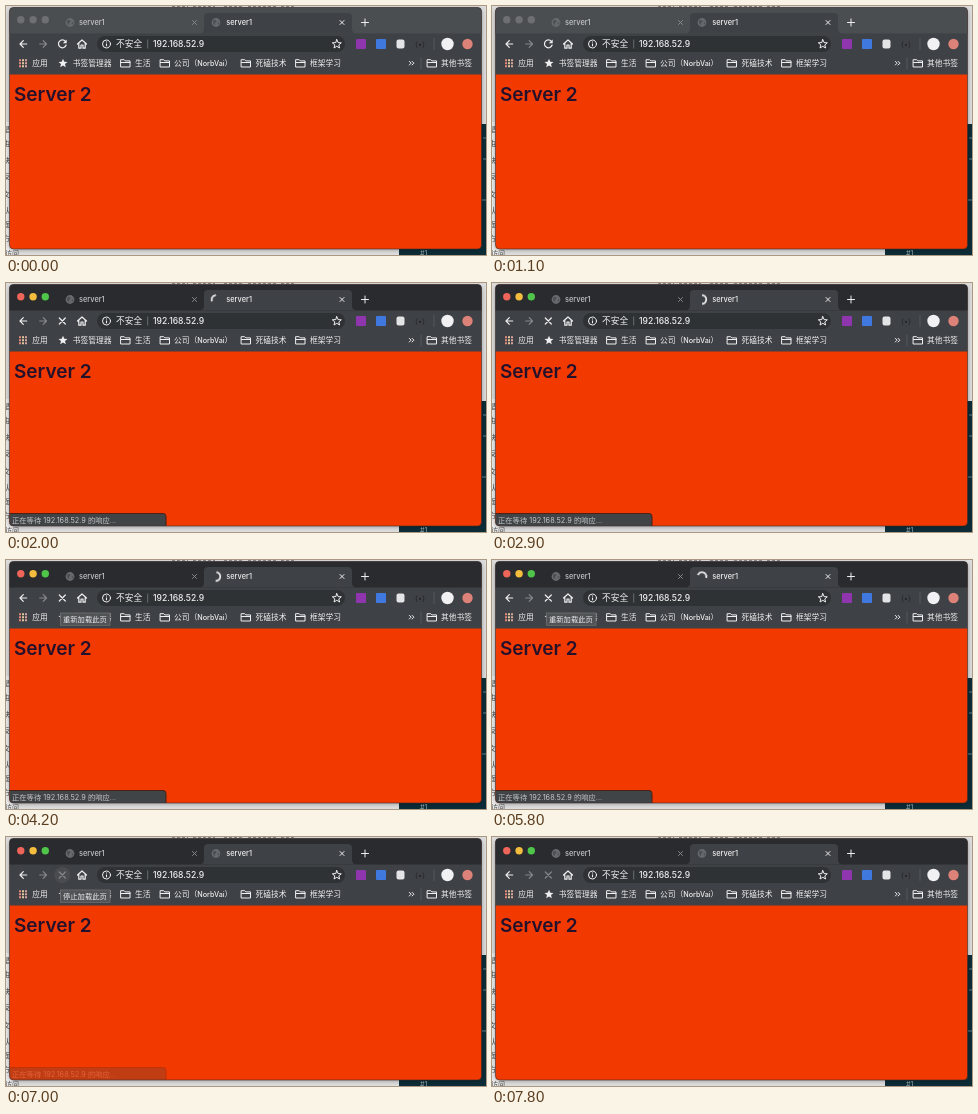
Recreate the animation shown at these times as an HTML page. Size 480 by 249 pixels, loop 8 s.

```html
<!DOCTYPE html>
<html lang="zh">
<head>
<meta charset="utf-8">
<title>Browser reload</title>
<style>
html, body { margin: 0; width: 100%; height: 100%; overflow: hidden; background: #dcdcdc; }
svg { display: block; width: 100vw; height: 100vh; }
text { font-family: Inter, "Noto Sans CJK SC", sans-serif; fill: #eeeff0; white-space: pre; }
.label { font-size: 7.75px; font-weight: 500; }
.latin { font-size: 7.2px; }
.tip text { font-size: 7.3px; font-weight: 500; }
.tip rect { fill: #505356; stroke: #727476; stroke-width: .7; }
.tab { font-size: 7.4px; font-weight: 500; fill: #c4c6c9; }
.behind text { font-size: 7px; fill: #444; }
.line { fill: none; stroke: #eeeff0; stroke-width: 1.2; stroke-linecap: round; stroke-linejoin: round; }
.thin { stroke-width: 1; }
.dim { stroke: #85888c; }

.idle, .live, .reload, .stop, .stopped, .hover, .globe, .tip, .status, .spinner {
  animation: 8s step-end infinite;
}
.idle { animation-name: idle; }
.live { animation-name: live; }
.hover { animation-name: hover; }
.reload { animation-name: reload; }
.stop, .spinner { animation-name: loading; }
.stopped { animation-name: stopped; }
.globe { animation-name: globe; }
.tip-reload { animation-name: tip-reload; }
.tip-stop { animation-name: tip-stop; }
.status { animation-name: status; animation-timing-function: linear; }
@keyframes idle { 0% { opacity: 1 } 17.5%, 100% { opacity: 0 } }
@keyframes live { 0% { opacity: 0 } 17.5%, 100% { opacity: 1 } }
@keyframes hover { 0%, 19.75%, 96.25%, 100% { opacity: 0 } 17.5% { opacity: 1 } 83.125% { opacity: .5 } }
@keyframes reload { 0% { opacity: 1 } 19.75%, 100% { opacity: 0 } }
@keyframes loading { 0%, 83.125%, 100% { opacity: 0 } 19.75% { opacity: 1 } }
@keyframes stopped { 0% { opacity: 0 } 83.125%, 100% { opacity: 1 } }
@keyframes globe { 0%, 83.125%, 100% { opacity: 1 } 19.75% { opacity: 0 } }
@keyframes tip-reload { 0%, 83.125%, 100% { opacity: 0 } 41.25% { opacity: 1 } }
@keyframes tip-stop { 0%, 96.25%, 100% { opacity: 0 } 83.125% { opacity: 1 } }
@keyframes status { 0%, 20.5% { opacity: 0 } 22%, 86.25% { opacity: 1 } 88%, 100% { opacity: 0 } }

/* One turn per 1320 ms, passing the top when loading begins at 1580 ms. */
.arc { stroke-width: 1.7; stroke-linecap: butt; animation: spin 8s linear infinite, grow 8s linear infinite; }
@keyframes spin { from { transform: rotate(430.909deg) } to { transform: rotate(-1750.909deg) } }
@keyframes grow { 0%, 19.75% { stroke-dasharray: 0 360 } 28%, 100% { stroke-dasharray: 180 360 } }
</style>
</head>
<body>
<svg viewBox="0 0 480 249" preserveAspectRatio="none">
  <defs>
    <clipPath id="frame"><rect x="3.5" y="1.5" width="472" height="241.5" rx="4"/></clipPath>
    <filter id="soft" x="-5%" y="-5%" width="110%" height="112%"><feGaussianBlur stdDeviation="2"/></filter>
    <path id="folder" class="line thin" d="M.5 1.2H3.7L4.8 2.4H9.5V8.5H.5ZM.5 4H9.5"/>
    <g id="globe">
      <circle r="4.4" fill="#66696d"/>
      <path d="M-3.2-1.8L-.6-2.8L.6-1L-1.2.8L-.6 3L-2.6 1.2ZM1.4.2L3.4-.4L2.6 2.4Z" fill="#4c4f53"/>
    </g>
    <path id="cross" d="M-2-2L2 2M2-2L-2 2"/>
    <path id="stop" d="M-3-3L3 3M3-3L-3 3"/>
    <path id="star" d="M0-4.4L1.3-1.4L4.5-1.2L2 .9L2.8 4L0 2.3L-2.8 4L-2 .9L-4.5-1.2L-1.3-1.4Z"/>
  </defs>

  <!-- desktop behind the window -->
  <rect width="480" height="249" fill="#dcdcdc"/>
  <rect y="116" width="8" height="133" fill="#ececec"/>
  <path d="M166 .5h16m5 0h22m9 0h18m6 0h28m5 0h14" stroke="#888" stroke-dasharray="3 2"/>
  <path d="M470 118H480V249H393V243H470Z" fill="#0c2d38"/>
  <path d="M477 132h3m-3 21h3m-4 41h4" stroke="#60808a"/>
  <g class="behind">
    <text x="-3" y="126">是</text><text x="-3" y="140">由</text>
    <text x="-3" y="157">快</text><text x="-3" y="173">反</text>
    <text x="-3" y="191">文</text><text x="-3" y="207">认</text>
    <text x="-3" y="221">面</text><text x="-3" y="235">方</text>
    <text x="-1" y="250">访问</text>
    <text x="414" y="250" style="fill:#9fb0b5">#1</text>
  </g>
  <rect x="3" y="3" width="473" height="241" rx="5" opacity=".3" filter="url(#soft)"/>

  <g clip-path="url(#frame)">
    <rect x="3" y="1" width="473" height="68" fill="#3e4145"/>
    <rect class="idle" x="3" y="1" width="473" height="26.5" fill="#4b4e51"/>
    <rect class="live" x="3" y="1" width="473" height="26.5" fill="#292b2e"/>
    <path d="M193 27.5Q198 27.5 198 22.5V11Q198 7 202 7H342Q346 7 346 11V22.5Q346 27.5 351 27.5Z" fill="#3e4145"/>

    <g class="idle" fill="#6d6f72">
      <circle cx="14.8" cy="13.8" r="3.7"/><circle cx="27.1" cy="13.8" r="3.7"/><circle cx="39.3" cy="13.8" r="3.7"/>
    </g>
    <g class="live">
      <circle cx="14.8" cy="13.8" r="3.7" fill="#f0655a"/>
      <circle cx="27.1" cy="13.8" r="3.7" fill="#f4bd3e"/>
      <circle cx="39.3" cy="13.8" r="3.7" fill="#4fc54a"/>
    </g>

    <!-- tabs -->
    <use href="#globe" x="64" y="16.5"/>
    <text class="tab" x="73" y="19.1">server1</text>
    <g class="globe"><use href="#globe" x="210" y="16.5"/></g>
    <g class="spinner"><g transform="translate(210 16.5)">
      <path class="line arc" d="M0-4.3A4.3 4.3 0 0 1 0 4.3" pathLength="180"/>
    </g></g>
    <text class="tab" x="220.3" y="19.1" style="fill:#eeeff0">server1</text>
    <g class="line thin">
      <use href="#cross" class="dim" x="188.5" y="16.5"/><use href="#cross" x="336" y="16.5"/>
      <path d="M355.5 16.5h7m-3.5-3.5v7"/>
    </g>

    <!-- toolbar -->
    <path class="line" d="M20.7 38H14M17.3 34.7L14 38L17.3 41.3"/>
    <path class="line dim" d="M33.7 38H40.4M37.2 34.7L40.5 38L37.2 41.3"/>
    <circle class="hover" cx="56.3" cy="38" r="8" fill="#56595d"/>
    <g class="reload">
      <path class="line" d="M59.4 35.4A3.9 3.9 0 1 0 60.1 39"/>
      <path d="M60.7 33.4V37.3H56.8Z" fill="#eeeff0"/>
    </g>
    <g class="stop"><use href="#stop" class="line" x="56.3" y="38"/></g>
    <g class="stopped"><use href="#stop" class="line dim" x="56.3" y="38"/></g>
    <path class="line" d="M71.5 38L76 34L80.5 38M72.8 37V42.2H75V39H77V42.2H79.2V37"/>

    <rect x="91" y="30" width="248" height="16" rx="8" fill="#2f3235"/>
    <circle class="line thin" cx="100.5" cy="38" r="4"/>
    <path d="M100.5 37.5v2.7m0-4.6v1" stroke="#eeeff0" stroke-width="1.1"/>
    <text x="110" y="41.2" font-size="8.7">不安全</text>
    <path d="M141.7 33.5v9" stroke="#777a7e" stroke-width=".8"/>
    <text x="147" y="41.1" font-size="8.6" font-weight="500">192.168.52.9</text>
    <use href="#star" class="line thin" x="330.8" y="38"/>

    <rect x="350" y="33" width="10" height="10" rx="1" fill="#8f35ad"/>
    <rect x="370" y="33" width="10" height="10" rx="1" fill="#3f78de"/>
    <rect x="390.5" y="33.5" width="8" height="9" rx="2" fill="#e3e4e5"/>
    <text x="409" y="40.5" font-size="7" style="fill:#222427">{•}</text>
    <path d="M428 32v12" stroke="#5c5f63" stroke-width=".8"/>
    <circle cx="441.5" cy="38" r="6.2" fill="#f1f1f3"/>
    <circle cx="461.5" cy="38" r="5.2" fill="#dc8278"/>

    <!-- bookmarks -->
    <g stroke-width="2" stroke-dasharray="2 1">
      <path d="M14 53.2v8" stroke="#e58a7d"/><path d="M17 53.2v8" stroke="#e3c9a0"/><path d="M20 53.2v8" stroke="#d9a59c"/>
    </g>
    <text class="label" x="26.3" y="60.2">应用</text>
    <use href="#star" x="57" y="57.2" fill="#eeeff0"/>
    <text class="label" x="66.7" y="60.2">书签管理器</text>
    <use href="#folder" x="114.5" y="52.5"/><text class="label" x="129" y="60.2">生活</text>
    <use href="#folder" x="154" y="52.5"/>
    <text class="label" x="168" y="60.2">公司（<tspan class="latin">NorbVai</tspan>）</text>
    <use href="#folder" x="235" y="52.5"/><text class="label" x="249.5" y="60.2">死磕技术</text>
    <use href="#folder" x="289.5" y="52.5"/><text class="label" x="304" y="60.2">框架学习</text>
    <path class="line thin" d="M403.3 55.4L405.1 57.2L403.3 59M406.1 55.4L407.9 57.2L406.1 59"/>
    <path d="M415 51.5v12" stroke="#5c5f63" stroke-width=".8"/>
    <use href="#folder" x="421" y="52.5"/><text class="label" x="435" y="60.2">其他书签</text>

    <!-- page -->
    <rect x="3" y="68.5" width="473" height="175" fill="#f13900"/>
    <text x="8" y="95" style="font-size:19px;font-weight:600;fill:#24112c">Server 2</text>

    <g class="status">
      <path d="M3 230.5H157Q160 230.5 160 233.5V244H3Z" fill="#414447" stroke="#4a2018"/>
      <text x="6" y="239.6" style="fill:#c3c5c7;font-size:7.3px">正在等待 192.168.52.9 的响应...</text>
    </g>
    <g class="tip tip-reload">
      <rect x="54.4" y="53" width="49.6" height="12.3"/>
      <text x="57" y="62">重新加载此页</text>
    </g>
    <g class="tip tip-stop">
      <rect x="54.4" y="53" width="49.6" height="12.3"/>
      <text x="57" y="62">停止加载此页</text>
    </g>
  </g>
  <rect x="3.5" y="1.5" width="472" height="241.5" rx="4" fill="none" stroke="#40302c" stroke-opacity=".6"/>
</svg>
</body>
</html>
```
